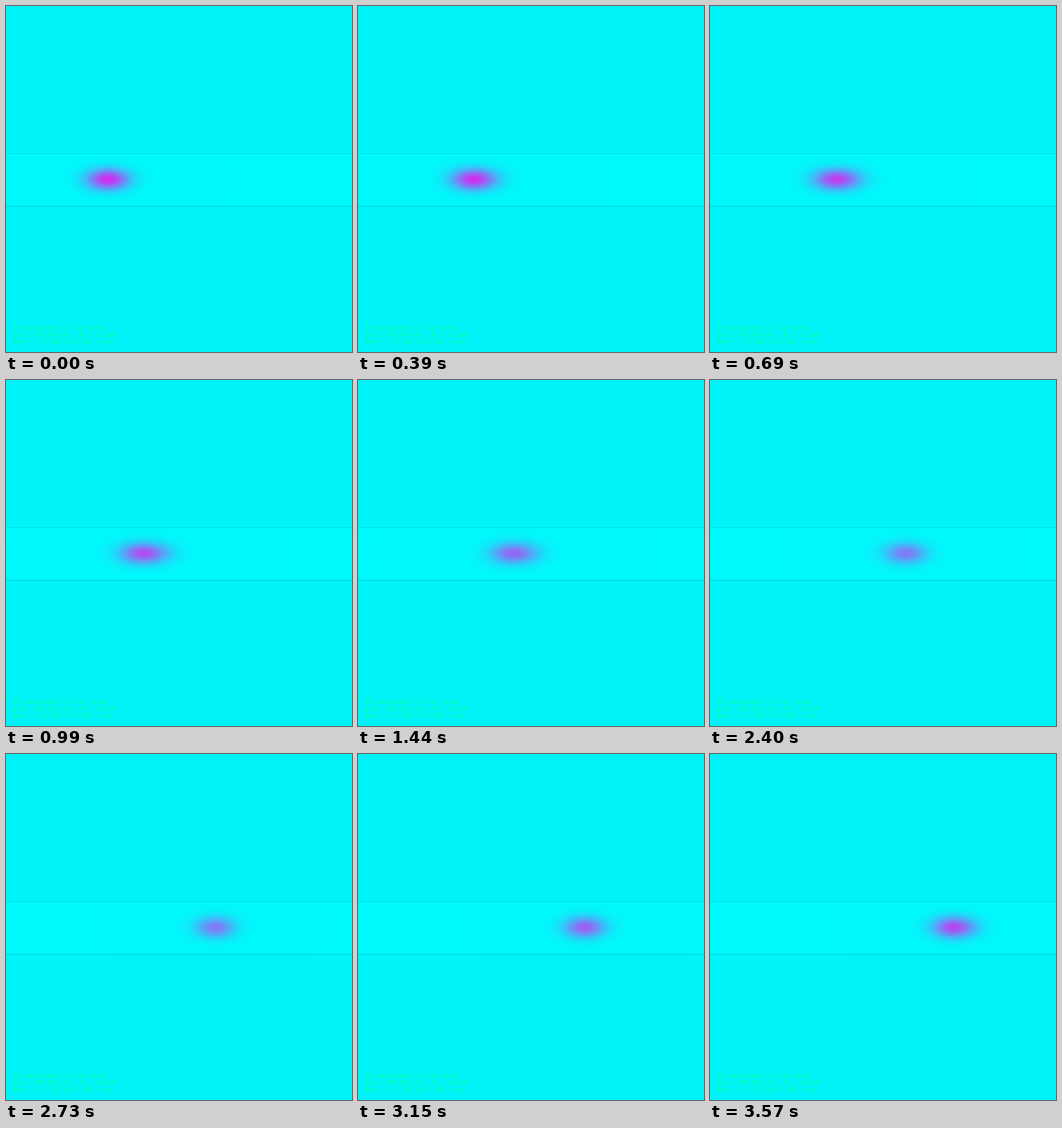
Recreate the animation shown at these times as a matplotlib script. Size 500 by 500 pixels, loop 3600 ms.

```python
import numpy as np
import matplotlib.pyplot as plt
from matplotlib.animation import FuncAnimation

SIZE, FRAMES, STEP = 500, 120, 30
BASE = np.array([0, 244, 247]) / 255
BAND = np.array([0, 249, 251]) / 255
PEAK = np.array([255, 0, 240]) / 255
GREEN = "#00ff82"

# Packet state over time: centre, strength, spread behind and ahead
TIMES = [0, 390, 990, 1440, 2040, 2730, 3570]
CENTRE = [147, 167, 198, 225, 261, 303, 352]
STRENGTH = [0.83, 0.82, 0.69, 0.59, 0.50, 0.52, 0.72]
BEHIND = [21, 22, 23, 23, 23, 20, 21]
AHEAD = [21, 23, 25, 24, 22, 19, 22]
SPREAD_Y = 10.5

ys, xs = np.mgrid[0:SIZE, 0:SIZE].astype(float)

stage = np.empty((SIZE, SIZE, 3))
stage[:] = BASE
stage[214:289] = BAND
stage[213] = np.array([0, 224, 228]) / 255
stage[289] = np.array([0, 205, 210]) / 255


def at(t, values):
    return np.interp(t, TIMES, values)


def packet(t):
    dx = xs - at(t, CENTRE)
    width = np.where(dx < 0, at(t, BEHIND), at(t, AHEAD))
    shape = np.exp(-0.5 * ((dx / width) ** 2 + ((ys - 250) / SPREAD_Y) ** 2))
    amount = (at(t, STRENGTH) * shape)[..., None]
    return stage * (1 - amount) + PEAK * amount


def label(x, y, text, color, alpha):
    return ax.text(x, y, text, color=color, alpha=alpha, fontsize=6,
                   family="DejaVu Sans Mono", va="baseline")


def clock(t):
    return f"Wave t = {t / 1000:.3f} of 3.600 s now"


fig = plt.figure(figsize=(5, 5), dpi=100)
ax = fig.add_axes([0, 0, 1, 1])
ax.axis("off")
image = ax.imshow(packet(0), interpolation="nearest", aspect="auto")

# Barely visible heading
for row, text in enumerate(["packet in a straight channel", "free run, no potential",
                            "mean  <x>   <p>   <E>", "periodic side walls",
                            "unit mass"]):
    label(17, 17 + 13 * row, text, "#00ffff", 0.3)
label(134, 335, "<x>           <p>      <E>", "#00ffff", 0.25)

label(10, 467, "2D wavepacket in flat guide", GREEN, 0.7)
label(10, 478, "grid: 500x500 pts, dt = 0.0100", GREEN, 0.7)
counter = label(10, 488, clock(0), GREEN, 0.7)


def draw(i):
    t = i * STEP
    image.set_data(packet(t))
    counter.set_text(clock(t))
    return image, counter


anim = FuncAnimation(fig, draw, frames=FRAMES, interval=STEP,
                     repeat=True, repeat_delay=0, blit=False)
plt.show()
```
